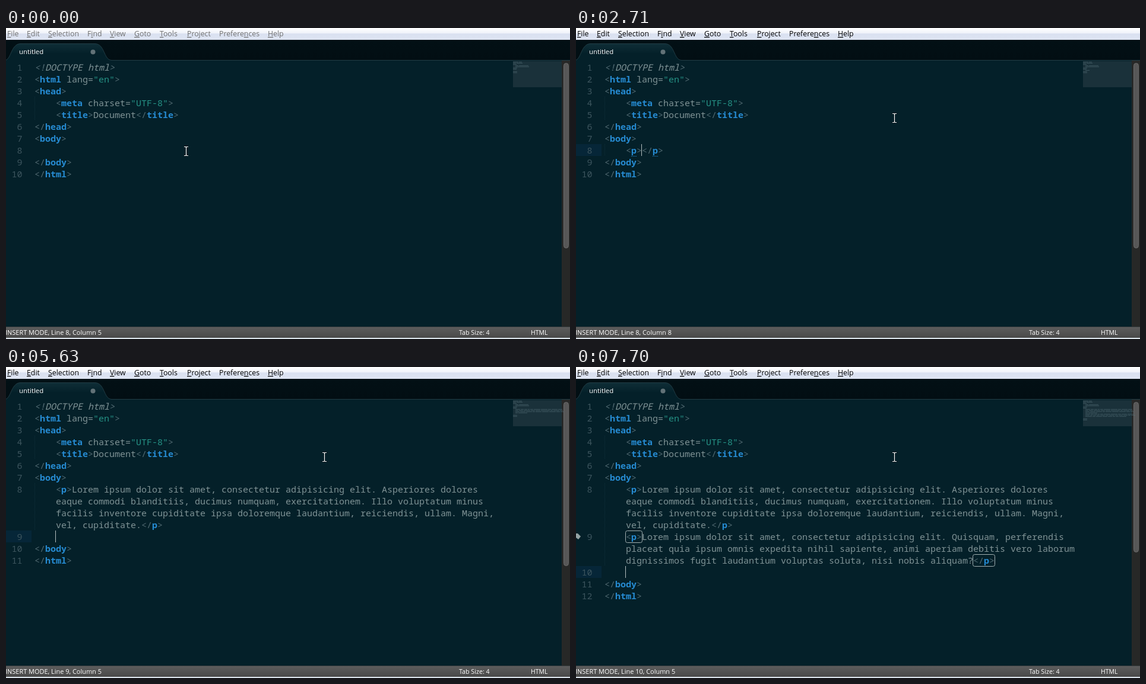
Recreate the animation shown at these times as an HTML page. Size 950 by 525 pixels, loop 8000 ms.

```html
<!DOCTYPE html>
<html lang="en">
<head>
<meta charset="utf-8">
<title>Editor typing demo</title>
<style>
  html, body { margin: 0; width: 950px; height: 525px; overflow: hidden; background: #042029; }
  svg { display: block; }
  text { white-space: pre; }
  .code text { font: 15px "Noto Sans Mono", "DejaVu Sans Mono", monospace; fill: #7f9295; }
  .code .num { fill: #3d555e; text-anchor: end; }
  .code .punct { fill: #526a72; }
  .code .name { fill: #268bd2; font-weight: bold; }
  .code .attr { fill: #7f9295; }
  .code .str { fill: #259286; }
  .code .doctype { font-style: italic; }
  .code .doctype .name { fill: #7f9295; font-weight: normal; }
  .ui { font: 10.95px "Open Sans", "Noto Sans", sans-serif; fill: #fff; }
  .menu { font: 12.3px "Open Sans", "Noto Sans", sans-serif; fill: #000; }
  .menu.off { fill: #707070; }
  .menu .key { text-decoration: underline; }
  .box { fill: none; stroke: #a3b0b1; }
  .mini { fill: #56717a; opacity: .55; }
</style>
</head>
<body>
<svg width="950" height="525" viewBox="0 0 950 525">
  <defs>
    <linearGradient id="bar" x2="0" y2="1">
      <stop offset="0" stop-color="#fff"/><stop offset=".42" stop-color="#f0f3fa"/>
      <stop offset=".5" stop-color="#d9e0f0"/><stop offset="1" stop-color="#dfe5f3"/>
    </linearGradient>
    <linearGradient id="head" x2="0" y2="1">
      <stop offset="0" stop-color="#021015"/><stop offset="1" stop-color="#020e13"/>
    </linearGradient>
    <linearGradient id="tab" x2="0" y2="1">
      <stop offset="0" stop-color="#0f2e37"/><stop offset=".6" stop-color="#042029"/>
    </linearGradient>
    <linearGradient id="foot" x2="0" y2="1">
      <stop offset="0" stop-color="#5e5e5e"/><stop offset="1" stop-color="#494949"/>
    </linearGradient>
  </defs>
  <rect width="950" height="525" fill="#042029"/>
  <rect width="950" height="20" fill="url(#bar)"/>
  <g id="menu" class="menu"></g>
  <rect y="20" width="950" height="34" fill="url(#head)"/>
  <path d="M-2 54.5C9 54 8 27 24 26.5H150C167 27 164 54 178 54.5Z" fill="url(#tab)"/>
  <path d="M-2 54.5C9 54 8 27 24 26.5H150C167 27 164 54 178 54.5H950" fill="none" stroke="#213c45"/>
  <text class="ui" x="22" y="44" style="font-size:11.4px">untitled</text>
  <circle cx="146.500" cy="40.500" r="4" fill="#627277"/>
  <rect x="936" y="55" width="14" height="449" fill="#272827"/>
  <rect id="thumb" x="939.500" y="59.500" width="8" rx="4" fill="#575757" stroke="#6a6a6a"/>
  <rect x="854" y="56" width="82" height="44" fill="#1a313a"/>
  <g id="code" class="code"></g>
  <rect y="504" width="950" height="19" fill="url(#foot)"/>
  <path d="M0 504.500H950" stroke="#363c3e"/>
  <rect y="523" width="950" height="2" fill="#dce4ec"/>
  <text id="status" class="ui" x="-1" y="518"></text>
  <text class="ui" x="763" y="518" style="font-size:10.7px">Tab Size: 4</text>
  <text class="ui" x="884" y="518" style="font-size:10.5px">HTML</text>
  <g id="mouse" fill="none">
    <path d="M-3.500 -7.500H-1L0 -6.500L1 -7.500H3.500M0 -6.500V6.500M-3.500 7.500H-1L0 6.500L1 7.500H3.500" stroke="#000" stroke-width="2.500" opacity=".45"/>
    <path d="M-3.500 -7.500H-1L0 -6.500L1 -7.500H3.500M0 -6.500V6.500M-3.500 7.500H-1L0 6.500L1 7.500H3.500" stroke="#fff" stroke-width="1.200"/>
  </g>
</svg>
<script>
const LOOP = 8000, ROW = 20, CH = 9, TOP = 56, LEFT = 48;
const $ = id => document.getElementById(id);
const code = $('code');

function add(parent, tag, attrs, text) {
  const node = document.createElementNS('http://www.w3.org/2000/svg', tag);
  for (const key in attrs) node.setAttribute(key, attrs[key]);
  if (text) node.textContent = text;
  return parent.appendChild(node);
}

const HEAD = ['<!DOCTYPE html>', '<html lang="en">', '<head>', '    <meta charset="UTF-8">',
  '    <title>Document</title>', '</head>', '<body>'];
const TAIL = ['</body>', '</html>'];
const TAB = '    ';
const para = text => TAB + '<p>' + text + '</p>';
const FIRST = para(`Lorem ipsum dolor sit amet, consectetur adipisicing elit. Asperiores dolores
    eaque commodi blanditiis, ducimus numquam, exercitationem. Illo voluptatum minus
    facilis inventore cupiditate ipsa doloremque laudantium, reiciendis, ullam. Magni,
    vel, cupiditate.`);
const SECOND = para(`Lorem ipsum dolor sit amet, consectetur adipisicing elit. Quisquam, perferendis
    placeat quia ipsum omnis expedita nihil sapiente, animi aperiam debitis vero laborum
    dignissimos fugit laudantium voluptas soluta, nisi nobis aliquam?`);

const typed = word => ({ col: 8 + word.length, pair: true });
const type8 = word => ({ body: [para(word)], ...typed(word) });
const type9 = word => ({ body: [FIRST, para(word)], ...typed(word) });

const start = { focus: false, body: [TAB], line: 8, col: 5, mode: 'INSERT', pair: false, boxed: 0, caret: 0, mouse: [303, 208] };
const script = [
  [0, {}],
  [120, { focus: true, caret: 1, mouse: [311, 207] }],
  [250, { mouse: [327, 206] }],
  [380, { mouse: [339, 205] }],
  [540, { mouse: [343, 205] }],
  [660, { mouse: [347, 204] }],
  [810, { caret: .5, mouse: [500, 165] }],
  [930, { caret: 0, mouse: [587, 139] }],
  [1080, { mouse: [539, 168] }],
  [1230, { mouse: [438, 200] }],
  [1380, { caret: .5, mouse: [450, 190] }],
  [1500, { caret: 1, mouse: [465, 176] }],
  [1650, { mouse: [520, 158] }],
  [1770, { caret: .5, mouse: [536, 152] }],
  [1920, { caret: 0 }],
  [2440, { caret: 1 }],
  [2590, { body: [TAB + 'p'], col: 6 }],
  [2710, type8('')],
  [2980, type8('l')],
  [3130, type8('lo')],
  [3250, type8('lor')],
  [3380, type8('lorem')],
  [3500, { body: [FIRST], col: 8, pair: false }],
  [3920, { caret: .5 }],
  [4040, { caret: 0 }],
  [4160, { caret: 1 }],
  [4310, { mode: 'COMMAND', col: 7, boxed: 8, caret: 0 }],
  [4590, { mode: 'INSERT', body: [FIRST, TAB], line: 9, col: 5, caret: 1 }],
  [4710, { boxed: 0 }],
  [4980, { caret: .5 }],
  [5100, { caret: 0 }],
  [5630, { caret: 1 }],
  [5930, { body: [FIRST, TAB + 'p'], col: 6 }],
  [6210, type9('')],
  [6330, type9('l')],
  [6610, type9('lor')],
  [6760, type9('lorem')],
  [6910, { body: [FIRST, SECOND], col: 8, pair: false }],
  [7330, { caret: .5 }],
  [7580, { mode: 'COMMAND', col: 7, boxed: 9, caret: 0 }],
  [7700, { mode: 'INSERT', body: [FIRST, SECOND, TAB], line: 10, col: 5, caret: 1 }]
];
let last = start;
const states = script.map(([at, patch]) => last = { ...last, ...patch, at });

function drawText(row, y) {
  const text = add(code, 'text', { x: LEFT, y: y + 16 });
  if (row.startsWith('<!')) text.setAttribute('class', 'doctype');
  const span = (cls, part) => part && add(text, 'tspan', { class: cls }, part);
  for (const m of row.matchAll(/(<[!/]?)(\w+)|(\s+\w+=)("[^"]*")|(>)|([^<>]+)/g)) {
    span('punct', m[1]);
    span('name', m[2]);
    span('attr', m[3]);
    span('str', m[4]);
    span('punct', m[5]);
    span('', m[6]);
  }
}

function drawMini(row, index) {
  for (const m of row.matchAll(/\S+/g))
    add(code, 'rect', { class: 'mini', x: 854 + m.index, y: TOP + 1 + index * 2, width: m[0].length, height: 1 });
}

function drawBoxes(rows, y) {
  const end = rows.length - 1;
  const box = (col, row, len) => add(code, 'rect',
    { class: 'box', x: LEFT + col * CH - .5, y: y + row * ROW + .5, width: len * CH + 1, height: 20, rx: 3 });
  box(4, 0, 3);
  box(rows[end].indexOf('</p>'), end, 4);
  add(code, 'path', { d: `M0 ${y + 5}H3L8 ${y + 10}L4 ${y + 15}L0 ${y + 12}Z`, fill: '#94a2a4' });
}

function drawPair(row, y) {
  for (const col of [5, row.indexOf('</p>') + 2])
    add(code, 'path', { d: `M${LEFT + col * CH} ${y + 20.5}h9`, stroke: '#268bd2', 'stroke-dasharray': '1 1' });
}

function draw(s) {
  code.textContent = '';
  let index = 0;
  [...HEAD, ...s.body, ...TAIL].forEach((line, i) => {
    const rows = line.split('\n'), y = TOP + index * ROW, num = i + 1, active = num === s.line;
    if (active && s.focus)
      add(code, 'rect', { y: y, width: 43, height: rows.length * ROW, fill: '#062638' });
    if (line.startsWith(TAB) && line !== TAB || active && s.caret && line !== TAB)
      add(code, 'path', { d: `M48.5 ${y}v${rows.length * ROW}`, stroke: '#10303a', 'stroke-dasharray': '1 1' });
    add(code, 'text', { class: 'num', x: 27.5, y: y + 16 }, String(num));
    rows.forEach((row, k) => {
      drawText(row, y + k * ROW);
      drawMini(row, index + k);
    });
    if (num === s.boxed) drawBoxes(rows, y);
    if (active) {
      const x = LEFT + (s.col - 1) * CH;
      if (s.pair) drawPair(line, y);
      if (s.mode === 'COMMAND') add(code, 'rect', { x: x, y: y + 18, width: 8, height: 1, fill: '#819090' });
      else add(code, 'rect', { x: x - 1, y: y, width: 1, height: ROW, fill: '#b4bfc0', opacity: s.caret });
    }
    index += rows.length;
  });
  $('thumb').setAttribute('height', Math.round(9434 / (index + 20.1)) - 1);
  $('status').textContent = `${s.mode} MODE, Line ${s.line}, Column ${s.col}`;
  $('menu').classList.toggle('off', !s.focus);
  $('mouse').setAttribute('transform', `translate(${s.mouse[0] + .5} ${s.mouse[1]})`);
}

const menus = { '&File': 2, '&Edit': 35, '&Selection': 71, 'F&ind': 137, '&View': 175, '&Goto': 216,
  '&Tools': 259, '&Project': 305, 'Prefere&nces': 359, '&Help': 441 };
for (const label in menus) {
  const [before, after] = label.split('&');
  const item = add($('menu'), 'text', { x: menus[label], y: 14 });
  add(item, 'tspan', {}, before);
  add(item, 'tspan', { class: 'key' }, after[0]);
  add(item, 'tspan', {}, after.slice(1));
}

const began = performance.now();
let shown = null;
function tick() {
  const t = (performance.now() - began) % LOOP;
  const state = states.findLast(s => s.at <= t) || states[0];
  if (state !== shown) draw(shown = state);
  requestAnimationFrame(tick);
}
tick();
</script>
</body>
</html>
```
